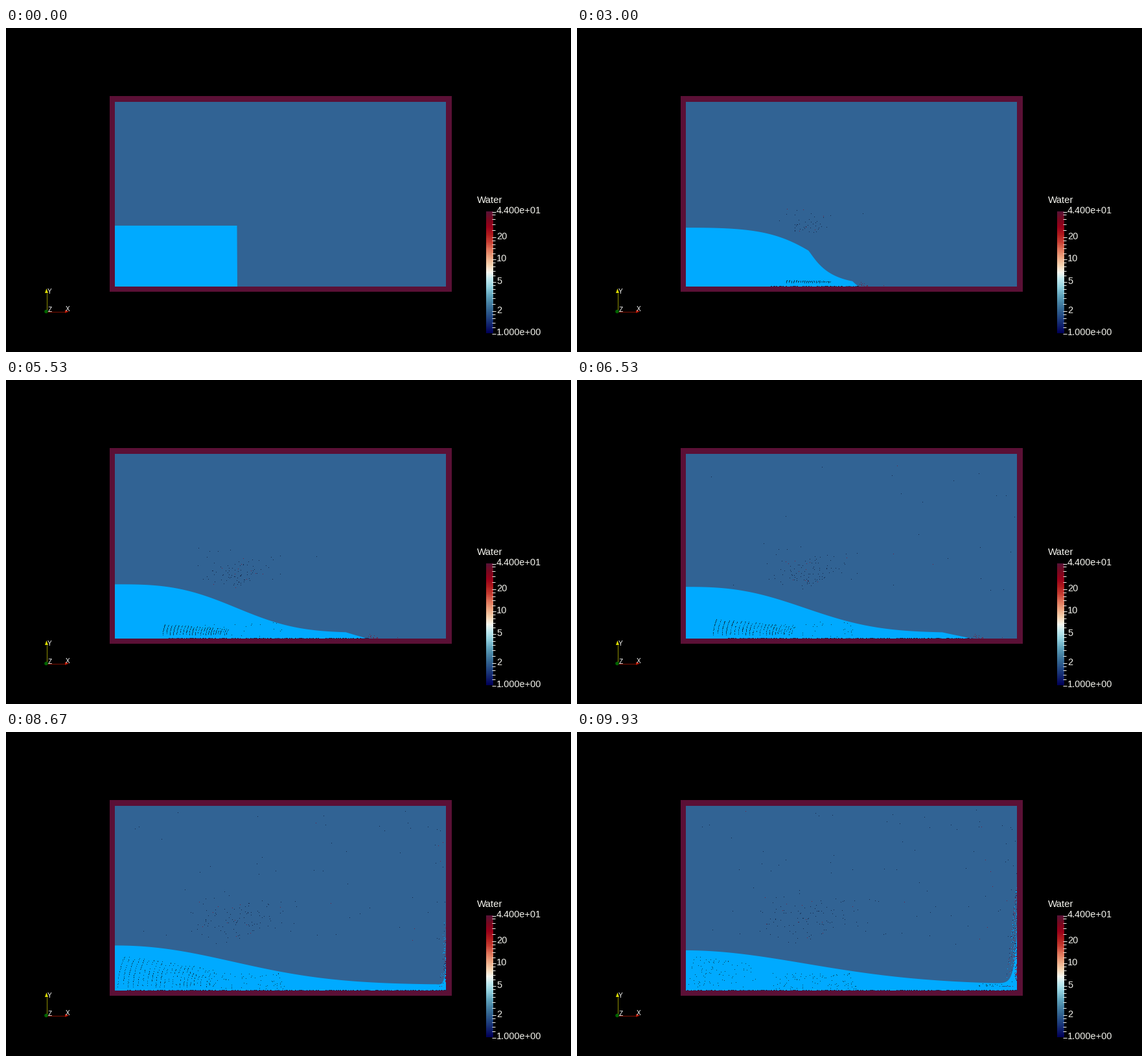
Animation of 872x500 px, one loop 9.99 s. Source, as a matplotlib script:

```python
import numpy as np
import matplotlib.pyplot as plt
from matplotlib.animation import FuncAnimation
from matplotlib.colors import LinearSegmentedColormap
from matplotlib.patches import Circle, Polygon, Rectangle

W, H, DPI = 872, 500, 100
SLOTS, LOOP = 150, 9990
LEFT, RIGHT, TOP, FLOOR = 168, 679, 114, 399
COLUMN_W, COLUMN_H, FILM = 189, 94, 9

WALL, AIR, WATER = "#5b1036", "#316394", "#00aaff"
TEXT = "#f2f2ec"

# The simulation skips a step in 11 of every 40 slots.
HOLDS = np.floor(40 * np.arange(1, 42) / 11 + 0.95)


def step_of(slot):
    return slot - int(np.sum(HOLDS <= slot))


def smooth(u):
    u = np.clip(u, 0, 1)
    return u * u * (3 - 2 * u)


def front_x(s):
    """The front starts at rest and settles at a constant speed."""
    return LEFT + COLUMN_W + 5.2 * (np.hypot(s, 28.8) - 28.8)


def height(x, s):
    d = x - LEFT
    top = COLUMN_H - 0.0034 * s ** 1.95

    # Sagging column with a concave toe, then a bell over a thin film.
    sag = 12 * (s / 19) ** 2 * np.clip(d / COLUMN_W, 0, 1) ** 2.5
    toe = np.maximum(d - COLUMN_W, 0) / max(0.58 * s, 0.01)
    early = (top - sag) * np.exp(-toe ** 1.2)
    width = 213 + 0.0155 * max(s - 50, 0) ** 2
    power = 0.6 + 147 / max(s, 30)
    late = FILM + (top - FILM) * np.exp(-(d / width) ** power)
    mix = smooth((s - 19) / 27)

    taper = np.clip((front_x(s) - x) / np.clip(0.009 * s * s, 0.5, 60), 0, 1)
    h = (early + (late - early) * mix) * taper

    # Run-up along the right wall.
    rise = max(s - 86, 0)
    return h + 3.4 * rise * np.exp(-(RIGHT - x) / (1.5 + 0.15 * rise))


rng = np.random.default_rng(7)

# Specks thrown up from the corner of the column.
N = 110
born = rng.uniform(6, 70, N)
start_x, start_y = rng.normal(357, 10, N), rng.uniform(303, 318, N)
vel_x, vel_y = rng.normal(0.2, 1.4, N), -rng.uniform(-0.4, 1.9, N)

# Stray specks across the air late in the run.
M = 90
stray_born = rng.uniform(62, 115, M)
stray_x = RIGHT - 3 - 500 * rng.random(M) ** 1.7
stray_y = rng.uniform(120, 330, M)
stray_vx = rng.normal(0, 0.35, M)

# Spray along the right wall.
K = 300
spray_born = rng.uniform(86, 108, K)
spray_v = rng.gamma(4, 0.85, K)
spray_d = rng.exponential(6.5, K) + 0.5

ahead, ahead_y = rng.exponential(11, 16), rng.uniform(392, 399, 16)

# Gaps inside the water: scattered, and a late cluster by the right wall.
deep_x = np.r_[rng.uniform(300, 430, 90), rng.normal(638, 9, 30)]
deep_y = np.r_[rng.uniform(372, 397, 90), rng.uniform(386, 393, 30)]
deep_born = np.r_[rng.uniform(40, 110, 90), rng.uniform(97, 109, 30)]

floor_x = np.arange(LEFT, RIGHT)
floor_r = rng.random(floor_x.size)
ARCS, DOTS = 24, 30
arc_r = rng.random((ARCS, DOTS))
arc_jit = rng.normal(0, 1, (ARCS, DOTS))


def fly(s):
    age, late = s - born, s - stray_born
    reach = 38 * (1 - np.exp(-np.maximum(age, 0) / 38))
    x = np.r_[start_x + vel_x * reach, stray_x + stray_vx * late]
    y = np.r_[start_y + vel_y * reach, stray_y - 0.15 * late]
    on = (np.r_[age, late] > 0) & (x > LEFT + 1) & (x < RIGHT - 1) & (y > TOP)
    return x[on], y[on]


def arcs(s):
    """Dotted gaps in the lower left of the water."""
    if s < 30:
        return np.empty(0), np.empty(0)
    left = max(172, 285 - 2.9 * (s - 46))
    tall = 46 * min(s / 95, 1) ** 2.5
    span = np.clip(3.8 + 0.117 * (s - 46), 3.8, 8)
    k = np.arange(ARCS)[:, None]
    u = np.linspace(0, 1, DOTS)[None, :]
    x = left + span * (1 - 0.975 ** k) / 0.025 + 0.22 * tall * u ** 2
    x = x + max(s - 90, 0) / 19 * arc_jit
    y = 393 - tall * (1 - 0.02 * k) * u
    keep = arc_r < 0.68 - 0.025 * max(s - 95, 0) - 0.02 * k
    return x[keep], y[keep]


fig = plt.figure(figsize=(W / DPI, H / DPI), dpi=DPI, facecolor="black")
ax = fig.add_axes([0, 0, 1, 1])


def box(x0, y0, x1, y1, color):
    ax.add_patch(Rectangle((x0, y0), x1 - x0, y1 - y0, fc=color, lw=0,
                           antialiased=False))


def label(x, y, s, px, color=TEXT):
    ax.text(x, y, s, color=color, fontsize=px * 72 / DPI, family="Liberation Sans",
            ha="left", va="baseline")


def line(xs, ys, color):
    ax.plot(xs, ys, color=color, lw=72 / DPI, solid_capstyle="butt", zorder=2)


def specks(color, z):
    return ax.plot([], [], ",", color=color, zorder=z)[0]


def put(art, x, y):
    art.set_data(np.floor(x) + 0.5, np.floor(y) + 0.5)


# Tank
box(160, 105, 688, 407, WALL)
box(LEFT, TOP, RIGHT, FLOOR, AIR)

# Colour legend on a log scale
BAR_TOP, BAR_BOTTOM = 283, 471
STOPS = [(0, "#000059"), (0.125, "#204380"), (0.19, "#336591"), (0.25, "#4985a6"),
         (0.31, "#63a7bf"), (0.375, "#92d1df"), (0.44, "#c0eaf0"), (0.5, "#f8f8f0"),
         (0.56, "#f7d5b2"), (0.625, "#eda682"), (0.69, "#e0755a"), (0.75, "#c83f34"),
         (0.81, "#b01c1e"), (0.875, "#990019"), (0.94, "#78081f"), (1, "#591236")]
cmap = LinearSegmentedColormap.from_list("warm", STOPS)
ax.imshow(np.linspace(1, 0, 188)[:, None], cmap=cmap, aspect="auto",
          extent=(741, 752, BAR_BOTTOM, BAR_TOP), interpolation="nearest")


def bar_y(v):
    return BAR_BOTTOM - (BAR_BOTTOM - BAR_TOP) * np.log(v) / np.log(44)


for lo, hi, gap in [(1, 2, 0.2), (2, 5, 0.5), (5, 10, 1), (10, 20, 2), (20, 44, 5)]:
    for v in np.arange(lo, hi - 1e-6, gap):
        y = np.floor(bar_y(v)) + 0.5
        line([750, 756 if v == lo else 755], [y, y], TEXT)
line([750, 756], [283.5, 283.5], TEXT)

label(727, 270, "Water", 15)
for v, s in [(44, "4.400e+01"), (20, "20"), (10, "10"), (5, "5"), (2, "2"),
             (1, "1.000e+00")]:
    label(757, bar_y(v) + 3.5, s, 14.5)

# Orientation axes
line([62.5, 62.5], [437, 409], "#8c8c00")
line([62, 92], [437.5, 437.5], "#801000")
ax.add_patch(Polygon([(62.5, 402), (60, 409), (65, 409)], fc="#d8d800", lw=0, zorder=3))
ax.add_patch(Polygon([(97, 437.5), (91, 435), (91, 440)], fc="#b41400", lw=0, zorder=3))
ax.add_patch(Circle((62, 437.5), 2.8, fc="#006400", lw=0, zorder=3))
for x, y, s in [(64, 410, "Y"), (64.5, 438, "Z"), (91.5, 437, "X")]:
    label(x, y, s, 10, "white")

# Moving parts
water = ax.add_patch(Polygon([(0, 0), (1, 0), (1, 1)], fc=WATER, lw=0, zorder=4))
air_dots = specks("#14284a", 3)
red_dots = specks("#6e2444", 3)
gap_dots = specks("#06405f", 5)
floor_dots = specks("#142a50", 5)
spray_blue = specks(WATER, 6)
spray_dark = specks("#14285a", 6)
spray_red = specks("#7a2a4a", 6)

ax.set_xlim(0, W)
ax.set_ylim(H, 0)
ax.axis("off")
grid = np.linspace(LEFT, RIGHT, 1023)


def update(slot):
    s = step_of(slot)
    front = min(front_x(s), RIGHT)
    surface = np.column_stack([grid, FLOOR - height(grid, s)])
    water.set_xy(np.vstack([surface, [RIGHT, FLOOR], [LEFT, FLOOR]]))

    x, y = fly(s)
    put(air_dots, x, y)
    fx = front + ahead * min(s / 40, 1)
    on = (fx < RIGHT - 2) & (s > 4)
    put(red_dots, np.r_[x[::9], fx[on]], np.r_[y[::9], ahead_y[on]])

    x, y = arcs(s)
    deep = deep_born < s
    x, y = np.r_[x, deep_x[deep]], np.r_[y, deep_y[deep]]
    wet = (x > LEFT) & (x < front - 6) & (FLOOR - y < height(x, s) - 1)
    put(gap_dots, x[wet], y[wet])

    # Gaps along the floor spread back from the foot of the column.
    on = (floor_x >= LEFT + COLUMN_W - 1.8 * s) & (floor_x < front) & (floor_r < 0.5)
    put(floor_dots, floor_x[on], np.full(on.sum(), FLOOR - 1))

    age = s - spray_born
    x = RIGHT - 1 - spray_d * np.clip(age / 16, 0.15, 1)
    y = np.maximum(386 - spray_v * age * 2.1, 235 + 9 * spray_d)
    x, y = x[age > 0], np.minimum(y[age > 0], 392)
    put(spray_blue, x[::2], y[::2])
    put(spray_dark, x[1::4], y[1::4])
    put(spray_red, x[3::4], y[3::4])
    return (water, air_dots, red_dots, gap_dots, floor_dots,
            spray_blue, spray_dark, spray_red)


anim = FuncAnimation(fig, update, frames=SLOTS, interval=LOOP / SLOTS,
                     repeat=True, repeat_delay=0, blit=False)
plt.show()
```
